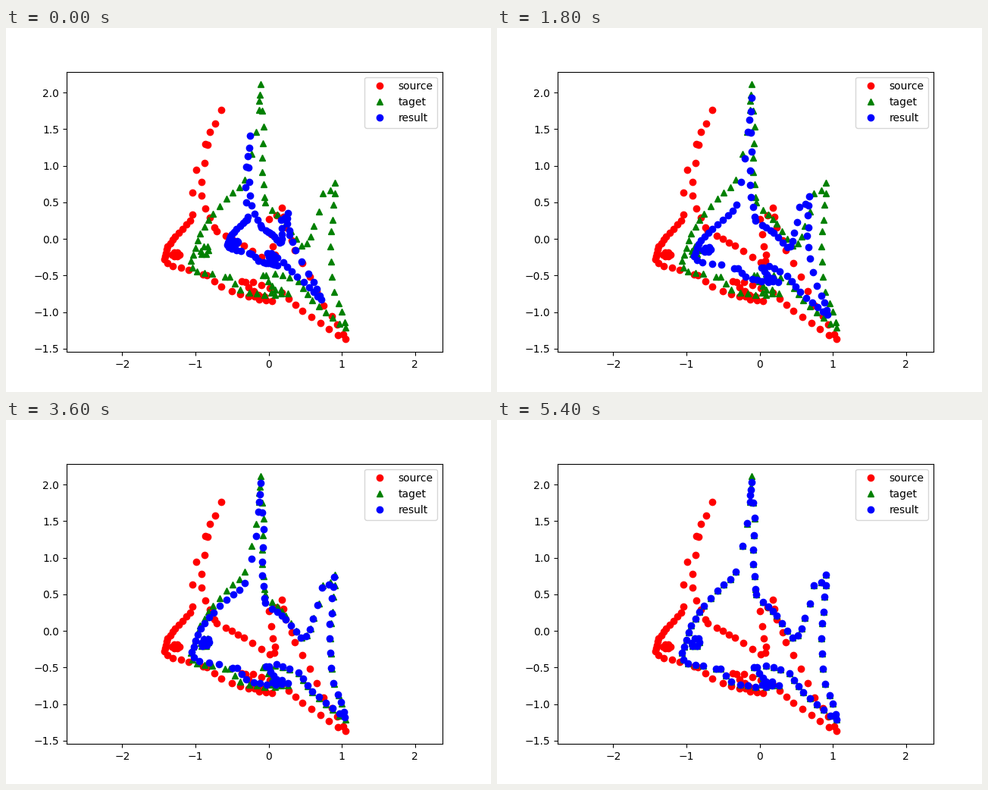
Recreate the animation shown at these times as a matplotlib script. Size 640 by 480 pixels, loop 5.7 s.

```python
import numpy as np
import matplotlib.pyplot as plt
from matplotlib.animation import FuncAnimation

FRAMES, INTERVAL = 19, 300


def path(*knots):
    """Points along knots (x, y) or (x, y, steps from the previous knot)."""
    pts = [np.array(knots[0], float)]
    for x, y, *steps in knots[1:]:
        n = steps[0] if steps else 1
        start, end = pts[-1], np.array([x, y])
        pts += [start + (end - start) * k / n for k in range(1, n + 1)]
    return np.array(pts) / 100


def ring(x, y, rx, ry, n):
    a = 2 * np.pi * np.arange(n) / n
    return np.column_stack([x + rx * np.cos(a), y + ry * np.sin(a)]) / 100


# Parts of the fish, in hundredths of a unit
head = path((-65, 176), (-80, 146), (-87, 130), (-99, 94), (-104, 63),
            (-104, 33), (-107, 25), (-128, 3, 4), (-138, -10, 3),
            (-142, -28, 4), (-138, -33), (-131, -37), (-109, -42, 2),
            (-90, -49), (-84, -50), (-65, -65, 2), (-50, -71),
            (-28, -79, 2), (-19, -79), (-13, -83), (5, -85, 2))
back = path((-73, 158), (-83, 129), (-92, 78, 2), (-92, 59), (-87, 42),
            (-74, 16, 2), (-71, 11), (-59, 4), (-34, -9, 3), (2, -32, 3),
            (8, -30), (9, -22), (6, -10), (4, 6), (0, 27), (11, 32), (18, 43))
tail = path((20, 30), (23, 16), (32, -2), (36, -15), (56, -52, 2),
            (75, -91, 2), (86, -106), (94, -117), (102, -130), (105, -137),
            (95, -131), (46, -98, 4), (18, -73, 3), (2, -67), (-21, -59, 2))
fin = path((-37, -58), (-32, -59), (-27, -66), (-14, -77, 2), (-6, -79))
eye = ring(-127, -21.5, 5, 3, 6)
source = np.vstack([head, back, tail, fin, eye])

# Landmarks of the cloud, and where they lie in three other shapes
marks = [0, 34, 37, 5, 8, 12, 17, 21, 26, 79, 32,
         75, 71, 67, 61, 58, 55, 53, 48, 42, 85]
goal = path((-11, 211), (-9, 175), (-9, 111), (-33, 81), (-58, 55), (-88, 17),
            (-106, -30), (-77, -47), (-26, -73), (-8, -50), (26, -74),
            (41, -58), (69, -92), (105, -121), (85, -31), (88, 26), (91, 77),
            (74, 62), (45, -9), (5, 40), (-82, -15))
shrunk = path((-25, 141), (-28, 98), (-23, 46), (-29, 30), (-35, 22), (-50, 6),
              (-57, -8), (-38, -16), (-7, -32), (-2, -20), (12, -36),
              (20, -32), (48, -59), (72, -83), (37, -15), (28, 12), (26, 35),
              (17, 26), (15, -5), (-4, 12), (-42, -4))
tall = path((-10, 189), (-15, 140), (-17, 67), (-30, 40), (-44, 21), (-65, 1),
            (-76, -20), (-46, -29), (-6, -46), (5, -33), (24, -51),
            (36, -47), (60, -74), (83, -95), (55, -25), (49, 10), (49, 48),
            (38, 34), (31, -13), (2, 15), (-54, -14))


def kernel(a, b):
    d2 = ((a[:, None] - b[None]) ** 2).sum(-1)
    return d2 * np.log(d2 + 1e-12)


def affine(p):
    return np.column_stack([np.ones(len(p)), p])


def spline_matrix(p, nodes):
    """Thin-plate spline weights that carry node values over to p."""
    a = affine(nodes)
    system = np.block([[kernel(nodes, nodes), a], [a.T, np.zeros((3, 3))]])
    basis = np.hstack([kernel(p, nodes), affine(p)])
    return basis @ np.linalg.inv(system)[:, :len(nodes)]


warp = spline_matrix(source, source[marks])
target = warp @ goal

# The top fin rises slowly, the belly slides slowly, the rest settles fast
gx, gy = goal.T
power = np.column_stack([np.where((gy < -.4) & (gx < .2), 1.4, 3.9),
                         np.where((gy > .1) & (gx < .2), 1.15, 2.7)])
STRETCHED = 4


def pose(i):
    if i < STRETCHED:
        # upwards first, then sideways
        knots = range(STRETCHED + 1)
        wx = np.interp(i, knots, [0, .06, .23, .58, 1])
        low = np.interp(i, knots, [0, .12, .38, .70, 1])
        high = np.interp(i, knots, [0, .46, .76, .91, 1])
        wy = low + (high - low) * np.clip(gy / 2, 0, 1)
        weight = np.column_stack([np.full(len(wy), wx), wy])
        return shrunk + (tall - shrunk) * weight
    left = (1 - (i - STRETCHED) / (FRAMES - 1 - STRETCHED)) ** power
    left[0, 1] = max(left[0, 1], .36)  # the tip never quite arrives
    return goal + (tall - goal) * left


fig, ax = plt.subplots(figsize=(6.4, 4.8), dpi=100)
ax.set_xlim(-2.761, 2.377)
ax.set_ylim(-1.544, 2.285)
ax.plot(*source.T, "ro", label="source")
ax.plot(*target.T, "g^", label="taget")
result, = ax.plot([], [], "bo", label="result")
ax.legend(loc="upper right")


def update(i):
    result.set_data(*(warp @ pose(i)).T)
    return result,


anim = FuncAnimation(fig, update, frames=FRAMES, interval=INTERVAL,
                     repeat=True, repeat_delay=0)
plt.show()
```
